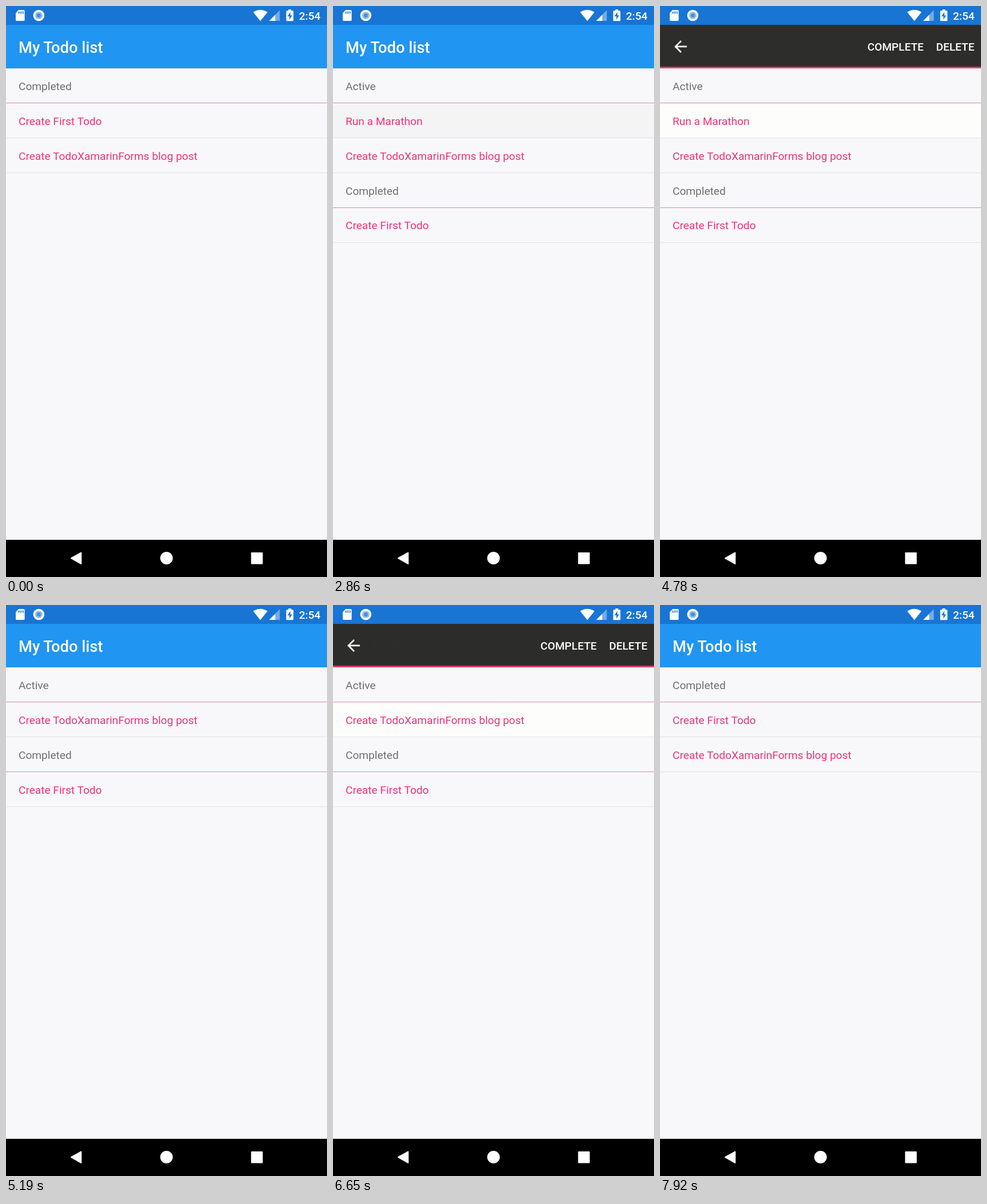
Write an HTML page that moves like this. It is 561 px wide and 998 px high and loops after 8540 ms.

```html
<!DOCTYPE html>
<html lang="en">
<head>
<meta charset="utf-8">
<title>Todo list</title>
<style>
  html, body { margin: 0; width: 100%; height: 100%; overflow: hidden; background: #000; }
  svg { display: block; width: 100%; height: 100%; }
  text { font: 400 19.1px Roboto, sans-serif; white-space: pre; }
  .medium { font-weight: 500; fill: #fff; }
  .title { font-size: 27.3px; }
  .section { fill: #6f6f6f; }
  .item { fill: #ee3376; }

  .full, .short, .bar, .press, .selected, .tap { animation: 8540ms linear infinite both; }
  .full { animation-name: full; }
  .short { animation-name: short; }
  .bar { animation-name: bar; }
  .press { animation-name: press; }
  .selected { animation-name: selected; }
  .tap { transform-box: fill-box; transform-origin: center; }
  .delete { animation-name: tap-delete; }
  .complete { animation-name: tap-complete; }

  @keyframes full {
    0%, .468% { opacity: 0; }
    10.187%, 58.43% { opacity: 1; }
    58.431%, 100% { opacity: 0; }
  }
  @keyframes short {
    0%, 58.43% { opacity: 0; }
    58.431%, 90.046% { opacity: 1; }
    90.047%, 100% { opacity: 0; }
  }
  @keyframes bar {
    0% { opacity: 0; }
    38.314%, 75.667% { opacity: 0; animation-timing-function: cubic-bezier(.5, 1, .89, 1); }
    40.656%, 78.009% { opacity: 1; }
    58.431%, 90.047% { opacity: 1; animation-timing-function: cubic-bezier(.5, 1, .89, 1); }
    60.773%, 92.389%, 100% { opacity: 0; }
  }
  @keyframes press {
    0%, 32.553% { opacity: 0; }
    35.48%, 38.313% { opacity: 1; }
    38.314%, 70.023% { opacity: 0; }
    72.95%, 75.666% { opacity: 1; }
    75.667%, 100% { opacity: 0; }
  }
  @keyframes selected {
    0%, 38.313% { opacity: 0; }
    38.314%, 58.43% { opacity: 1; }
    58.431%, 75.666% { opacity: 0; }
    75.667%, 90.046% { opacity: 1; }
    90.047%, 100% { opacity: 0; }
  }
  @keyframes tap-delete {
    0%, 55.972% { opacity: 0; transform: scale(.3); }
    58.431% { opacity: .14; transform: scale(1); }
    60.773%, 100% { opacity: 0; transform: scale(1); }
  }
  @keyframes tap-complete {
    0%, 88.407% { opacity: 0; transform: scale(.3); }
    90.047% { opacity: .14; transform: scale(1); }
    92.389%, 100% { opacity: 0; transform: scale(1); }
  }
</style>
</head>
<body>
<svg viewBox="0 0 561 998" preserveAspectRatio="none">
  <defs><clipPath id="toolbar"><path d="M0 33H561V109H0z"/></clipPath></defs>

  <g id="lists"></g>

  <!-- status bar -->
  <path fill="#1875d3" d="M0 0H561V33H0z"/>
  <g fill="#fff">
    <path d="M22 7H31a1.6 1.6 0 0 1 1.6 1.6V24.4a1.6 1.6 0 0 1-1.6 1.6H18.6a1.6 1.6 0 0 1-1.6-1.6V12.3z"/>
    <path stroke="#1875d3" stroke-width="1.8" d="M22.7 9.5v4M26.2 9.5v4M29.7 9.5v4"/>
    <circle cx="57.3" cy="16.5" r="9.8"/>
    <circle cx="57.3" cy="16.5" r="6.3" fill="#8fbbeb"/>
    <circle cx="57.3" cy="16.5" r="3.4" fill="#4a8fdc"/>
    <path d="M444.500 26.300L432 10.800Q444.500 2.600 457 10.800z"/>
    <path opacity=".4" d="M460 26L478.500 7.300V26z"/>
    <path d="M460 26L470.500 15.400V26z"/>
    <path d="M493.500 8.300V6H498.500V8.300H501Q502.300 8.300 502.300 9.600V25Q502.300 26.300 501 26.300H491Q489.700 26.300 489.700 25V9.600Q489.700 8.300 491 8.300z"/>
    <path fill="#1875d3" d="M497 10.500L492 18H495.300V24L500 16.400H497z"/>
  </g>
  <text class="medium" x="512" y="23.800">2:54</text>

  <!-- toolbar -->
  <path fill="#2095f1" d="M0 33H561V109H0z"/>
  <text class="medium title" x="22" y="81.500">My Todo list</text>

  <!-- action mode -->
  <g class="bar" clip-path="url(#toolbar)">
    <path fill="#2d2d2b" d="M0 33H561V109H0z"/>
    <circle class="tap complete" cx="412" cy="71" r="50" fill="#fff"/>
    <circle class="tap delete" cx="516" cy="71" r="50" fill="#fff"/>
    <path fill="#f03e70" d="M0 106.300H561V109H0z"/>
    <path fill="#fff" transform="translate(19.6 54.6) scale(1.365)" d="M20 11H7.830l5.590-5.590L12 4l-8 8 8 8 1.410-1.410L7.830 13H20z"/>
    <text class="medium" x="362.500" y="78">COMPLETE</text>
    <text class="medium" x="482.500" y="78">DELETE</text>
  </g>

  <!-- navigation bar -->
  <path d="M0 933H561V998H0z"/>
  <g fill="#fff" stroke="#fff" stroke-width="2" stroke-linejoin="round">
    <path d="M114 965.200L131.200 955.500V975z"/>
    <circle cx="280.500" cy="965" r="10"/>
    <path d="M429.300 956H447.700V974.500H429.300z"/>
  </g>
</svg>
<script>
  const ROW = 60.9, TOP = 109;
  const ACTIVE = '#Active', COMPLETED = '#Completed';
  const FIRST = 'Create First Todo';
  const RUN = 'Run a Marathon';
  const POST = 'Create TodoXamarinForms blog post';

  const band = (name, fill) => `<path class="${name}" fill="${fill}" d="M0 170H561V230H0z"/>`;

  function row(label, i) {
    const heading = label[0] === '#';
    const y = TOP + ROW * i;
    return `<text class="${heading ? 'section' : 'item'}" x="22" y="${y + 37.8}">${label.replace('#', '')}</text>
      <rect y="${Math.floor(y + ROW)}" width="561" height="1" fill="${heading ? '#dc8ba6' : '#e3e3e5'}"/>`;
  }

  const list = (name, labels, selectable) => `<g class="${name}">
    <path fill="#f8f8fb" d="M0 109H561V933H0z"/>
    ${selectable ? band('press', '#edede9') + band('selected', '#fdfdfc') : ''}
    ${labels.map(row).join('')}</g>`;

  // Opaque lists are stacked, so fading one in gives a true cross-fade.
  document.getElementById('lists').innerHTML =
    list('done', [COMPLETED, FIRST, POST], false) +
    list('full', [ACTIVE, RUN, POST, COMPLETED, FIRST], true) +
    list('short', [ACTIVE, POST, COMPLETED, FIRST], true);
</script>
</body>
</html>
```
